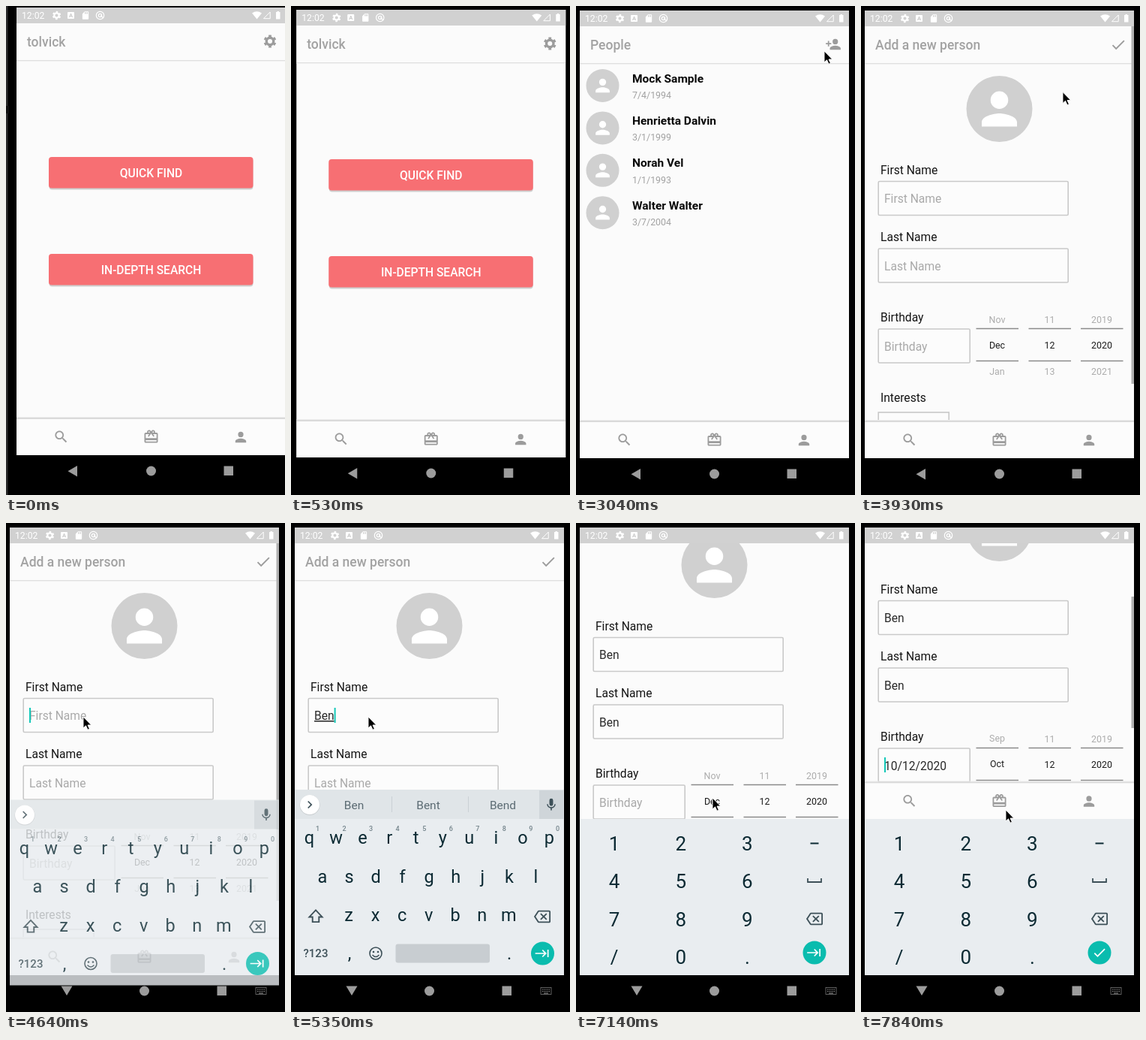
These frames come from a looping animation (372 by 651 pixels, 8000 ms). An HTML page:

```html
<!DOCTYPE html>
<html lang="en">
<head>
<meta charset="utf-8">
<title>Gift finder app</title>
<style>
html, body { margin: 0; width: 100%; height: 100%; overflow: hidden; background: #000; }
svg { display: block; width: 372px; height: 651px; font-family: Roboto, sans-serif; }
text { white-space: pre; }
.mid { text-anchor: middle; }
.title { font-size: 17.5px; font-weight: 500; fill: #a2a2a2; }
.btn { font-size: 15.6px; font-weight: 500; fill: #fff; }
.name { font-size: 15.5px; font-weight: 700; fill: #080808; }
.date { font-size: 12.4px; fill: #a2a2a2; }
.label, .value { font-size: 15.6px; fill: #141414; }
.value { fill: #2a2a2a; }
.hint { fill: #a9a9a9; }
.typing { text-decoration: underline; }
.pick { font-size: 12.4px; fill: #1c1c1c; }
.off { fill: #acacac; }
.key { font-size: 23.5px; fill: #0c2a33; }
.num { font-size: 26px; fill: #0c2a33; }
.sup { font-size: 9px; font-weight: 500; fill: #74848b; }
.word { font-size: 15.5px; fill: #5b6b73; }
</style>
</head>
<body>
<svg id="stage" viewBox="0 0 372 651"></svg>
<script>
const ICONS = {
  search: 'M15.5 14h-.79l-.28-.27C15.41 12.59 16 11.11 16 9.5 16 5.91 13.09 3 9.5 3S3 5.91 3 9.5 5.91 16 9.5 16c1.61 0 3.09-.59 4.23-1.57l.27.28v.79l5 4.99L20.49 19zm-6 0C7.01 14 5 11.99 5 9.5S7.01 5 9.5 5 14 7.01 14 9.5 11.99 14 9.5 14z',
  gift: 'M20 6h-2.18c.11-.31.18-.65.18-1 0-1.66-1.34-3-3-3-1.05 0-1.96.54-2.5 1.35l-.5.67-.5-.68C10.96 2.54 10.05 2 9 2 7.34 2 6 3.34 6 5c0 .35.07.69.18 1H4c-1.11 0-2 .89-2 2v11c0 1.11.89 2 2 2h16c1.11 0 2-.89 2-2V8c0-1.11-.89-2-2-2zm-5-2a1 1 0 1 1 0 2 1 1 0 1 1 0-2zM9 4a1 1 0 1 1 0 2 1 1 0 1 1 0-2zm11 15H4v-2h16zm0-5H4V8h5.08L7 10.83 8.62 12 12 7.4 15.38 12 17 10.83 14.92 8H20z',
  person: 'M12 12a4 4 0 1 0 0-8 4 4 0 1 0 0 8zm0 2c-2.67 0-8 1.34-8 4v2h16v-2c0-2.66-5.33-4-8-4z',
  addPerson: 'M15 12a4 4 0 1 0 0-8 4 4 0 1 0 0 8zm-9-2V7H4v3H1v2h3v3h2v-3h3v-2zm9 4c-2.67 0-8 1.34-8 4v2h16v-2c0-2.66-5.33-4-8-4z',
  check: 'M9 16.17 4.83 12l-1.42 1.41L9 19 21 7l-1.41-1.41z',
  mic: 'M12 14a3 3 0 0 0 3-3V5a3 3 0 0 0-6 0v6a3 3 0 0 0 3 3zm5.3-3c0 3-2.54 5.1-5.3 5.1S6.7 14 6.7 11H5c0 3.41 2.72 6.23 6 6.72V21h2v-3.28c3.28-.48 6-3.3 6-6.72z',
  erase: 'M22 3H7c-.69 0-1.23.35-1.59.88L0 12l5.41 8.11c.36.53.9.89 1.59.89h15c1.1 0 2-.9 2-2V5c0-1.1-.9-2-2-2zm0 16H7.07L2.4 12l4.66-7H22zm-11.59-2L14 13.41 17.59 17 19 15.59 15.41 12 19 8.41 17.59 7 14 10.59 10.41 7 9 8.41 12.59 12 9 15.59z',
  tab: 'M11.59 7.41 15.17 11H1v2h14.17l-3.59 3.59L13 18l6-6-6-6zM20 6v12h2V6z',
  chevron: 'M10 6 8.59 7.41 13.17 12l-4.58 4.59L10 18l6-6z',
  card: 'M18 2h-8L4 8v12c0 1.1.9 2 2 2h12c1.1 0 2-.9 2-2V4c0-1.1-.9-2-2-2zm-6 6h-2V4h2zm3 0h-2V4h2zm3 0h-2V4h2z'
};
const GREY = '#9c9c9c', INK = '#3d5058';
const PEOPLE = [['Mock Sample', '7/4/1994'], ['Henrietta Dalvin', '3/1/1999'],
  ['Norah Vel', '1/1/1993'], ['Walter Walter', '3/7/2004']];
const MONTHS = 'Jan Feb Mar Apr May Jun Jul Aug Sep Oct Nov Dec'.split(' ');
const WORDS = { B: ['B', 'Be', 'But'], Be: ['Be', 'Been', 'Best'], Ben: ['Ben', 'Bent', 'Bend'] };

const at = (x, y, s) => `transform="translate(${x} ${y}) scale(${s}) translate(-12 -12)"`;
const icon = (name, x, y, s = .9, fill = GREY, id = '') =>
  `<path ${id && `id="${id}"`} d="${ICONS[name]}" fill="${fill}" fill-rule="evenodd" ${at(x, y, s)}/>`;
const gear = (x, y, s, c) => `<g ${at(x, y, s)} fill="none" stroke="${c}">
  <circle cx="12" cy="12" r="5.5" stroke-width="3.9"/>
  <circle cx="12" cy="12" r="8.2" stroke-width="3.2" pathLength="12" stroke-dasharray="1 1" stroke-dashoffset="-.5"/></g>`;
const text = (cls, x, y, s, id = '') => `<text ${id && `id="${id}"`} class="${cls}" x="${x}" y="${y}">${s}</text>`;
const rect = (x, y, w, h, fill, more = '') => `<rect x="${x}" y="${y}" width="${w}" height="${h}" fill="${fill}" ${more}/>`;
const circle = (x, y, r, fill, more = '') => `<circle cx="${x}" cy="${y}" r="${r}" fill="${fill}" ${more}/>`;
const line = (d, c, w = 1.5) => `<path d="${d}" fill="none" stroke="${c}" stroke-width="${w}"/>`;
const each = (list, fn) => [...list].map(fn).join('');

const header = title => rect(5, 27, 359, 49, '#fbfbfb') + rect(5, 76, 359, 1, '#e0e0e0') +
  rect(5, 77, 359, 1, '#f1f1f1') + text('title', 19, 58, title);
const button = (y, s) => rect(48.5, y + 1.5, 272, 42, '#000', 'rx="4" opacity=".18"') +
  rect(48, y, 272.5, 41.5, '#f76f73', 'rx="4"') + text('btn mid', 184.5, y + 27, s);
const avatar = (x, y, r, s) => circle(x, y, r, '#d0d0d0') + icon('person', x, y, s, '#fff');
const field = (name, i, y, w) => text('label', 26, y, name) +
  rect(23.2, y + 10, w, 45, '#fcfcfc', 'rx="1.5" stroke="#c9c9c9" stroke-width="1.6"') +
  text('value', 31, y + 38.5, '', 'value' + i);

const home = header('tolvick') + gear(343, 51, .86, GREY) + button(205, 'QUICK FIND') + button(334, 'IN-DEPTH SEARCH');

const people = header('People') + `<circle id="tap" cx="343" cy="51" r="24" fill="#e2e2e2"/>` +
  icon('addPerson', 343, 51, .9) + PEOPLE.map(([name, born], i) => {
    const y = 106 + i * 56.4;
    return avatar(35.5, y, 22, 1.17) + text('name', 75, y - 4.5, name) + text('date', 75, y + 17, born);
  }).join('');

const column = (x, list, id) => `<g clip-path="url(#wheel)"><g id="${id}">` +
  list.map((s, i) => text('pick mid', x, 456.5 + i * 34.3, s)).join('') + '</g></g>' +
  line(`M${x - 28} 429.5h56.5m0 43h-56.5`, '#8a8a8a', 1.4);
const form = header('Add a new person') + icon('check', 343, 51.5, .95) + avatar(184.5, 137, 44, 2.94) +
  field('First Name', 0, 223.5, 253) + field('Last Name', 1, 313, 253) + field('Birthday', 2, 420, 122) +
  column(181.5, MONTHS.concat('Jan'), 'month') + column(251.5, [11, 12, 13], 'day') +
  column(321, [2019, 2020, 2021], 'year') +
  text('label', 26, 527, 'Interests') + rect(23.2, 541, 94, 45, '#fcfcfc', 'stroke="#c9c9c9" stroke-width="1.6"') +
  `<rect id="caret" width="2" height="20" fill="#14c8b8"/>`;

const tabs = rect(5, 551, 359, 1, '#ececec') + rect(5, 552, 359, 2, '#dadada') + rect(5, 554, 359, 48, '#fcfcfc') +
  `<circle id="ripple" cx="311" cy="578" fill="#dfdfdf" clip-path="url(#tabClip)"/>` +
  icon('search', 64.5, 577.5) + icon('gift', 184.5, 577.5) + icon('person', 304, 578);

const status = rect(5, 6, 359, 21, '#d1d1d1') +
  `<text x="12" y="21" font-size="12.2" fill="#fff">12:02</text>` + gear(58.5, 16.5, .58, '#fff') +
  rect(73, 12, 9, 9, '#fff', 'rx="1"') + `<text class="mid" x="77.5" y="19.3" font-size="7.5" font-weight="700" fill="#c8c8c8">A</text>` +
  icon('card', 97, 16.5, .52, '#fff') + circle(116.5, 16.5, 5.2, 'none', 'stroke="#fff" stroke-width="1.2"') +
  circle(116.5, 16.5, 2.2, 'none', 'stroke="#fff" stroke-width="1.2"') + line('M117 16.5l4 3.5', '#fff', 1.2) +
  '<path d="M319 13.5q6.5-4.5 13 0l-6.5 8z" fill="#fff"/>' + line('M334.5 20.7h8.7v-8.7z', '#fff', 1) +
  '<path d="M351 12h1.5v-1h2.500v1h1.500v9.500h-5.500z" fill="#fff"/>';

const system = rect(5, 602, 359, 49, '#000') + circle(184.5, 623, 6.5, GREY) + rect(281.5, 616.5, 12.5, 12.5, GREY) +
  `<path id="back" fill="${GREY}"/><g id="switcher">` + rect(333, 618.5, 14, 9, 'none', 'stroke="#777" stroke-width=".8"') +
  line('M335 621h10M335 623.500h10', GREY, 1.2) .replace('/>', ' stroke-dasharray="1.2 1"/>') + line('M337 626h6', GREY, 1) + '</g>';

const row = (keys, x, y) => each(keys, (c, i) => text('key mid', x + 35.55 * i, y, c));
const enter = (x, y) => circle(x, y, 15.5, '#0abcae');
const letters = rect(5, 355, 359, 39, '#e0e5e8') + rect(331, 356, 32, 38, '#cfd5d9') +
  circle(25, 375.5, 13.5, '#000', 'opacity=".1"') + circle(25, 375, 13, '#fff') + icon('chevron', 25, 375, .85, INK) +
  icon('mic', 347, 375, .82, INK) + '<g id="words">' + line('M134.5 364v21M236.500 364v21', '#cad1d5', 1) +
  each([84, 183, 282.5], (x, i) => text('word mid', x, 381, '', 'word' + i)) + '</g>' +
  row('qwertyuiop', 24.5, 427) + row('asdfghjkl', 42, 478.5) + row('zxcvbnm', 77, 530) +
  each('1234567890', (c, i) => text('sup mid', 35.5 + 35.55 * i, 410, c)) +
  `<path d="M12 3.500 21 13h-4.500v7h-9v-7H3z" fill="none" stroke="${INK}" stroke-width="2" ${at(33, 523.5, .95)}/>` +
  icon('erase', 335, 524, .92, INK) +
  `<text class="mid" x="33" y="578" font-size="15" font-weight="500" fill="${INK}">?123</text>` +
  text('key mid', 78, 581, ',') + text('key mid', 291, 581, '.') +
  circle(113, 573, 8, 'none', `stroke="${INK}" stroke-width="1.6"`) + circle(110, 571, 1.3, INK) + circle(116, 571, 1.3, INK) +
  line('M108.500 575q4.500 5 9 0', INK) + rect(139.5, 560.5, 125.5, 25, '#c8cdd1', 'rx="3"') +
  enter(335.5, 573) + icon('tab', 335, 573, .85, '#fff');
const digits = each(['1', '2', '3', '4', '5', '6', '7', '8', '9', '/', '0', '.'], (c, i) =>
  text('num mid', 51 + 88.7 * (i % 3), 435.5 + 50.5 * Math.floor(i / 3), c)) +
  line('M312.500 426.500h11', '#0c2a33', 2) + line('M309 473v5h18v-5', INK, 1.8) + icon('erase', 318, 527, .92, INK) +
  enter(318, 572) + icon('tab', 317.5, 572, .85, '#fff', 'next') + icon('check', 318, 572, .85, '#fff', 'done');

const stage = document.getElementById('stage');
stage.innerHTML = `<defs>
  <clipPath id="view">${rect(5, 27, 359, 575, '#000')}</clipPath>
  <clipPath id="tabClip">${rect(5, 554, 359, 48, '#000')}</clipPath>
  <clipPath id="wheel">${rect(150, 408, 205, 88, '#000')}</clipPath></defs>
<g id="phone">${rect(-9, -10, 2.5, 680, '#2b2b2b')}${rect(-9, 137, 4, 10, '#111')}
  ${rect(5, 6, 359, 596, '#fbfbfb')}
  <g clip-path="url(#view)"><g id="home">${home}</g><g id="people">${people}</g><g id="form">${form}</g>
    <g id="tabs">${tabs}</g><rect id="bar" x="360.5" width="3.5" fill="#b0b0b0"/></g>
  ${status}${system}
  <g id="keyboard">${rect(5, 394, 359, 208, '#e9edf0')}<g id="letters">${letters}</g><g id="digits">${digits}</g></g>
</g>
<path id="cursor" d="M0 0V15l3.500-3.200L6 17.200l2.400-1L6 11h4.700z" stroke="#fff" stroke-width=".9"/>`;

const el = {};
stage.querySelectorAll('[id]').forEach(n => el[n.id] = n);
const show = (n, on) => n.style.display = on ? '' : 'none';
const move = (n, x, y) => n.setAttribute('transform', `translate(${x} ${y})`);
const set = (n, o) => { for (const a in o) n.setAttribute(a, o[a]); };

// keys: [step, value...]; values are interpolated between steps
function track(keys, k) {
  const i = keys.findIndex(p => p[0] > k);
  if (i < 0) return keys[keys.length - 1].slice(1);
  if (!i) return keys[0].slice(1);
  const a = keys[i - 1], b = keys[i], f = (k - a[0]) / (b[0] - a[0]);
  return a.slice(1).map((v, j) => v + (b[j + 1] - v) * f);
}
const SLIDE = [[0, 9, -4], [4, 0, 0]];
const POINTER = [[7, 300, 621], [8, 308, 595], [9, 311, 578], [14, 311, 578], [15, 311, 535], [16, 277, 244],
  [17, 331, 60], [18, 338, 49], [21, 338, 49], [23, 200, 180], [24, 118, 242], [25, 103, 258], [37, 103, 258],
  [39, 175, 355], [40, 182, 366], [42, 184, 415], [43, 185, 429], [44, 193, 382]];
const PAN = [[30, 0], [31, 13], [35, 13], [36, 60], [37, 81], [41, 81], [42, 130]];
const MONTH = [[40, 11], [41, 10.5], [42, 9.6], [43, 9.12], [44, 9.03]];
const typed = (k, from) => 'Ben'.slice(0, Math.max(0, k - from + 1));

function wheel(g, v) {
  move(g, 0, -v * 34.3);
  [...g.children].forEach((n, i) => n.classList.toggle('off', Math.abs(i - v) > .5));
}

function draw(k) {
  move(el.phone, ...track(SLIDE, k));
  show(el.cursor, k >= 7);
  move(el.cursor, ...track(POINTER, k));

  show(el.home, k < 12);
  show(el.people, k >= 12 && k < 21);
  show(el.form, k >= 21);
  show(el.tap, k === 20);
  show(el.ripple, k === 10 || k === 11);
  el.ripple.setAttribute('r', k === 10 ? 32 : 63);

  const [pan] = track(PAN, k), resized = k >= 42;
  move(el.form, 0, -pan);
  move(el.tabs, 0, resized ? -207.5 : 0);
  show(el.bar, resized || k >= 21 && k <= 26);
  set(el.bar, resized ? { y: 98, height: 175 } : { y: 27, height: 476 });

  const focus = k < 26 ? -1 : k < 31 ? 0 : k < 36 ? 1 : 2;
  const values = [typed(k, 28), typed(k, 33), k >= 43 ? '10/12/2020' : ''];
  ['First Name', 'Last Name', 'Birthday'].forEach((hint, i) => {
    const n = el['value' + i];
    n.textContent = values[i] || hint;
    n.classList.toggle('hint', !values[i]);
    n.classList.toggle('typing', i === focus && i < 2 && !!values[i]);
  });
  show(el.caret, focus >= 0 && !(focus === 2 && k % 6 > 3));
  const before = focus >= 0 && focus < 2 && values[focus] ? el['value' + focus].getComputedTextLength() : 0;
  set(el.caret, { x: 31 + before, y: [246, 336, 442][focus] || 0 });
  wheel(el.month, track(MONTH, k)[0]);
  wheel(el.day, 1);
  wheel(el.year, 1);

  const open = k >= 26, rising = k === 26;
  show(el.keyboard, open);
  move(el.keyboard, 0, rising ? 13.5 : 0);
  el.keyboard.setAttribute('opacity', rising ? .8 : 1);
  show(el.letters, focus < 2);
  show(el.digits, focus === 2);
  show(el.next, !resized);
  show(el.done, resized);
  const words = WORDS[values[focus]];
  show(el.words, !!words);
  if (words) words.forEach((w, i) => el['word' + i].textContent = w);
  show(el.switcher, open);
  el.back.setAttribute('d', open ? 'M73.500 616.500h15l-7.500 12.500z' : 'M86 616v14.500l-12.500-7.250z');
}

let last = -1;
function tick() {
  const k = Math.min(44, Math.floor((performance.now() % 8000 + 8) / 178.3));
  if (k !== last) draw(last = k);
  requestAnimationFrame(tick);
}
tick();
</script>
</body>
</html>
```
